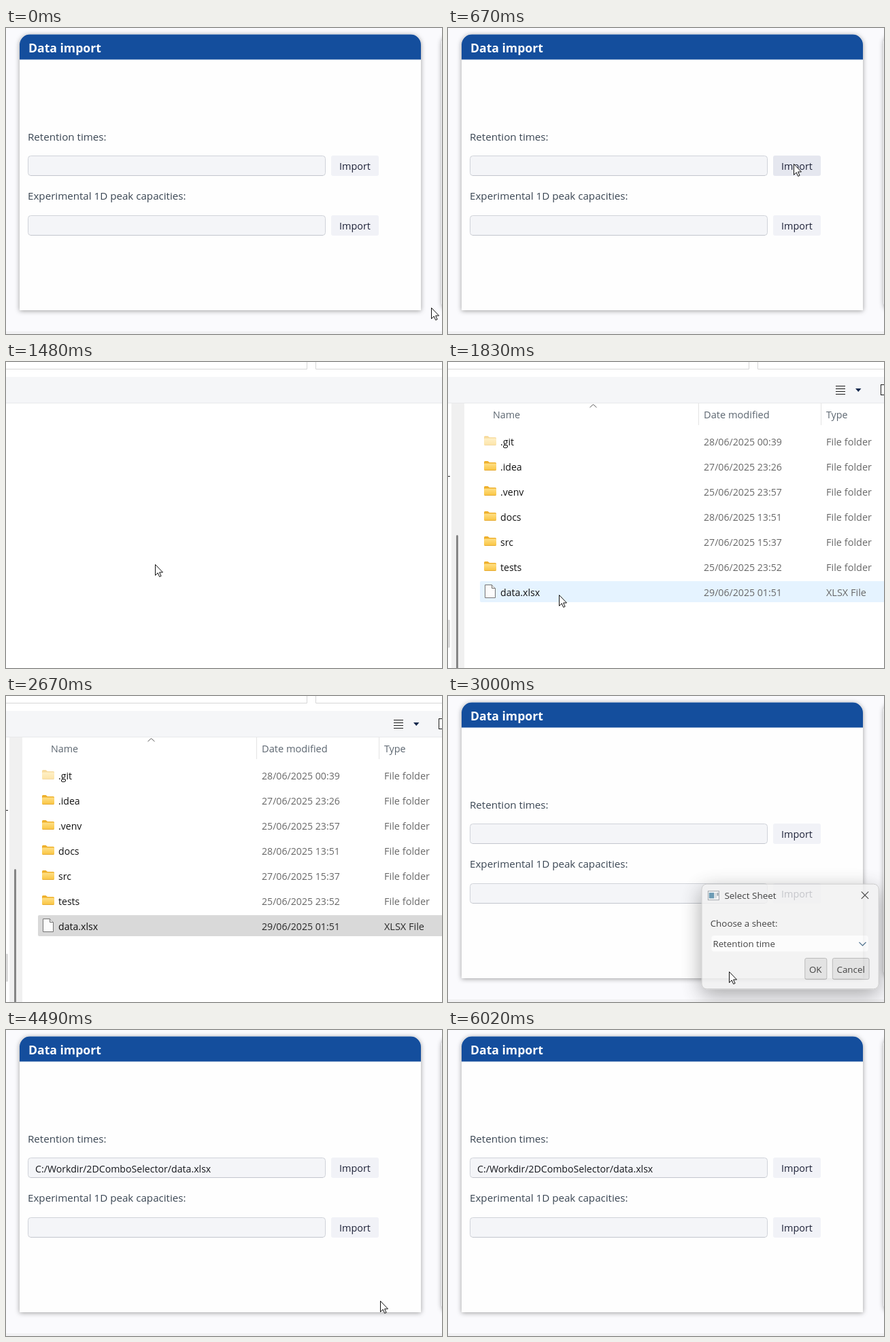
Animation of 641 by 451 pixels, one loop 6630 ms. Source, as an HTML page:

```html
<!DOCTYPE html>
<html lang="en">
<head>
<meta charset="utf-8">
<title>Data import</title>
<style>
  html, body { margin: 0; width: 100%; height: 100%; overflow: hidden; background: #fafafd; }
  svg { display: block; width: 641px; height: 451px; }
  text { font-family: "Open Sans", "Noto Sans", sans-serif; white-space: pre; }
</style>
</head>
<body>
<svg id="stage" viewBox="0 0 641 451" xmlns="http://www.w3.org/2000/svg"></svg>
<script>
const LOOP = 6630, STEP = 66;
const stage = document.getElementById('stage');

const txt = (x, y, s, size, fill, extra = '') =>
  `<text x="${x}" y="${y}" font-size="${size}" fill="${fill}" ${extra}>${s}</text>`;
const box = (x, y, w, h, fill, extra = '') =>
  `<rect x="${x}" y="${y}" width="${w}" height="${h}" fill="${fill}" ${extra}/>`;
const line = (d, stroke, width = 1, extra = '') =>
  `<path d="${d}" fill="none" stroke="${stroke}" stroke-width="${width}" ${extra}/>`;

// Import card
const field = y =>
  box(32.5, y + .5, 437, 29, '#f4f5f8', 'rx="4" stroke="#d0d3d9"') +
  line(`M36 ${y + 29.5}H466`, '#c3c6cd');
const button = (y, id) =>
  box(478, y, 70, 30, '#f1f2f7', `rx="3" id="${id}"`) +
  txt(490, y + 21, 'Import', 14.4, '#1e2238');
const panel = (bottom, fill) =>
  `<path d="M20 ${bottom}V24.500a15 15 0 0 1 15-15H595a15 15 0 0 1 15 15V${bottom}Z" fill="${fill}"/>`;

const card =
  box(0, 0, 641, 451, '#fafafd') +
  box(0, 447, 641, 4, '#f2f2f4') +
  `<g filter="url(#soft)">${panel(416, '#fefefe')}${box(640.5, 10, 60, 406, '#fefefe', 'rx="12"')}</g>` +
  panel(46.5, '#144e9d') +
  txt(33, 36, 'Data import', 17.6, '#fff', 'font-weight="700"') +
  txt(32, 166, 'Retention times:', 15.15, '#3a4653') +
  field(188) + button(188, 'importBtn') +
  txt(32, 253, 'Experimental 1D peak capacities:', 15.15, '#3a4653') +
  field(276) + button(276, 'importBtn2') +
  txt(43, 210, 'C:/Workdir/2DComboSelector/data.xlsx', 14.15, '#16181d', 'id="path"');

// File browser
const ROWS = [
  ['.git', '28/06/2025 00:39'],
  ['.idea', '27/06/2025 23:26'],
  ['.venv', '25/06/2025 23:57'],
  ['docs', '28/06/2025 13:51'],
  ['src', '27/06/2025 15:37'],
  ['tests', '25/06/2025 23:52'],
  ['data.xlsx', '29/06/2025 01:51']
];
const ROW_TOP = 101, ROW_GAP = 37, ROW_H = 31, LAST = ROWS.length - 1;

const folder = (y, faded) =>
  `<g transform="translate(53 ${y})" opacity="${faded ? .45 : 1}">
    <path d="M0 1.500Q0 0 1.500 0H5.500L8 2H16.500Q18 2 18 3.500V7H0Z" fill="#eeb02c"/>
    <rect y="3.500" width="18" height="10.500" rx="1.300" fill="url(#gold)"/>
    <path d="M1 13.500H17" stroke="#e5ab38"/>
  </g>`;
const sheetIcon = y =>
  `<g transform="translate(54.500 ${y})" fill="#fcfcfc" stroke="#747474">
    <path d="M0 0H10L15 5V19H0Z"/><path d="M10 0V5H15" fill="#e8e8e8"/>
  </g>`;

const row = ([name, date], i) => {
  const y = ROW_TOP + ROW_GAP * i, base = y + 22, isFile = i === LAST;
  const meta = isFile ? 'class="meta"' : '';
  return (isFile ? sheetIcon(y + 5.5) : folder(y + 8, i === 0)) +
    txt(77, base, name, 14.1, '#111') +
    txt(376, base, date, 14.15, '#686868', meta) +
    txt(556, base, isFile ? 'XLSX File' : 'File folder', 14.5, '#686868', meta);
};

const browser =
  box(0, 0, 641, 451, '#fff') +
  line('M0 10.500H442.500V0M455.500 0V10.500H641', '#d6d6d6') +
  box(0, 22, 641, 39, '#f5f6f8') +
  line('M0 60.500H641', '#e8e9eb') +
  `<g id="list">` +
    line('M570 35.500H584M570 39.500H584M570 43.500H584M570 47.500H584', '#1c1c1c') +
    `<path d="M599 39H607.500L603.250 44Z" fill="#15294d"/>` +
    box(636.5, 33.5, 14, 15, '#fff', 'stroke="#1c1c1c"') +
    box(5, 61, 19, 390, '#f0f0f0') +
    box(12, 255, 3, 210, '#858585', 'rx="1.5"') +
    box(-4, 380, 7, 41, '#dadada', 'rx="1"') +
    line('M0 168.500H3', '#222') +
    line('M208.500 67L213.500 62.500L218.500 67', '#5c5c5c') +
    line('M368.500 61V93M548.500 61V93', '#e3e3e3') +
    txt(66, 83, 'Name', 14.3, '#5c6670') +
    txt(376, 83, 'Date modified', 14.6, '#5c6670') +
    txt(556, 83, 'Type', 14.3, '#5c6670') +
    box(47, 0, 600, ROW_H, '#e5f3ff', 'rx="2" id="mark"') +
    ROWS.map(row).join('') +
  `</g>`;

// Sheet chooser
const push = (x, w, label, tx, id) =>
  box(x + .5, 390.5, w - 1, 33, '#dddddd', `rx="2.5" stroke="#a6a6a6" id="${id}"`) +
  txt(tx, 413, label, 14.2, '#151515');

const chooser =
  `<g filter="url(#deep)">${box(369.5, 274.5, 276, 164, '#f1f1f1', 'rx="8" stroke="#b9b9b9"')}</g>` +
  box(379.5, 285.5, 17, 14, '#f7f7f7', 'stroke="#8b9298"') +
  box(381, 288, 8, 9, '#4b86a5') +
  box(390.5, 288, 2, 9, '#c3cbd1') + box(393.5, 288, 2, 5, '#7d8b95') +
  txt(405, 298, 'Select Sheet', 14.3, '#151515') +
  line('M618.500 286.500L629.500 297.500M629.500 286.500L618.500 297.500', '#1c1c1c', 1.2) +
  txt(383, 341, 'Choose a sheet:', 14.2, '#151515') +
  box(385, 355, 244, 25, '#fcfcfc', 'rx="4"') +
  txt(387, 373, 'Retention time', 14.1, '#151515') +
  line('M615 365.500L620.300 370.700L625.600 365.500', '#1d4a70', 1.3) +
  push(530, 35, 'OK', 537, 'ok') +
  push(573, 58, 'Cancel', 580, 'cancel');

stage.innerHTML =
  `<defs>
    <filter id="soft" x="-5%" y="-5%" width="110%" height="110%">
      <feDropShadow dx="0" dy="1" stdDeviation="3.500" flood-color="#000" flood-opacity=".38"/>
    </filter>
    <filter id="deep" x="-30%" y="-40%" width="160%" height="190%">
      <feDropShadow dx="0" dy="9" stdDeviation="16" flood-color="#000" flood-opacity=".42"/>
    </filter>
    <linearGradient id="gold" x2="0" y2="1">
      <stop stop-color="#ffdf85"/><stop offset="1" stop-color="#f9c440"/>
    </linearGradient>
  </defs>
  <g>${card}</g>
  <g id="browser">${browser}</g>
  <g id="chooser">${chooser}</g>
  <path id="cursor" d="M.5 .5V16.500L4.200 12.900L6.700 18.500L9.100 17.400L6.600 12H11.500Z"
    fill="#fff" stroke="#111" stroke-linejoin="round"/>`;

const el = id => document.getElementById(id);
const ui = Object.fromEntries(
  ['path', 'importBtn', 'browser', 'list', 'mark', 'chooser', 'ok', 'cursor'].map(id => [id, el(id)]));
const meta = document.querySelectorAll('.meta');

// Pointer route: time, x, y
const ROUTE = [
  [0, 625, 412], [250, 592, 330], [400, 548, 232], [530, 520, 172], [664, 508, 200],
  [800, 508, 200], [960, 440, 222], [1130, 328, 252], [1270, 259, 274],
  [1550, 202, 308], [1830, 163, 343], [2670, 163, 343],
  [2800, 270, 372], [3000, 413, 406], [3200, 392, 402], [3300, 392, 402],
  [3480, 472, 364], [3650, 560, 357], [3820, 558, 385], [3950, 550, 399],
  [4880, 550, 399], [4890, 550, 398], [LOOP, 550, 398]
];
const BEATS = [0, 70, 830, 1270, 1550, 1830, 2670, 3000, 3350, 3820, 4090, 4890, 6020];

const ramp = (t, a, b) => Math.min(1, Math.max(0, (t - a) / (b - a)));
const easeOut = p => 1 - (1 - p) ** 3;
const show = (node, on) => node.setAttribute('visibility', on ? 'inherit' : 'hidden');
const inside = ([x, y], l, t, r, b) => x >= l && x < r && y >= t && y < b;

// The screen refreshes in short steps counted from each burst of activity
function snap(t) {
  const start = BEATS.filter(b => b <= t).pop();
  return start + Math.floor((t - start) / STEP) * STEP;
}

function pointer(t) {
  const i = Math.max(1, ROUTE.findIndex(k => k[0] >= t));
  const [t0, x0, y0] = ROUTE[i - 1], [t1, x1, y1] = ROUTE[i];
  const p = ramp(t, t0, t1);
  return [Math.round(x0 + (x1 - x0) * p), Math.round(y0 + (y1 - y0) * p)];
}

function render(time) {
  const t = snap(time), pos = pointer(t);

  ui.cursor.setAttribute('transform', `translate(${pos})`);
  show(ui.cursor, t < 6020 && !(t >= 2670 && t < 2730));

  ui.importBtn.setAttribute('fill', t < 1200 && inside(pos, 478, 188, 548, 218) ? '#e5e7ef' : '#f1f2f7');
  show(ui.path, t >= 4400);

  const fade = ramp(t, 1340, 1460) - ramp(t, 2740, 2870);
  ui.browser.setAttribute('opacity', fade);
  show(ui.browser, fade > 0);
  show(ui.list, t >= 1550 && fade > 0);

  const picked = t >= 2670;
  const over = Math.floor((pos[1] - ROW_TOP) / ROW_GAP);
  const index = picked ? LAST : Math.min(LAST, Math.max(0, over));
  ui.mark.setAttribute('y', ROW_TOP + ROW_GAP * index);
  ui.mark.setAttribute('fill', picked ? '#d9d9d9' : '#e5f3ff');
  meta.forEach(m => m.setAttribute('fill', picked ? '#2a2a2a' : '#686868'));

  const open = easeOut(ramp(t, 2930, 3230)), shut = ramp(t, 4090, 4350);
  const scale = 1 - .126 * (1 - open) - .1 * shut;
  const alpha = Math.min(1, open * 1.45) * (1 - shut);
  ui.chooser.setAttribute('opacity', alpha);
  ui.chooser.setAttribute('transform', `translate(430 320) scale(${scale}) translate(-430 -320)`);
  show(ui.chooser, alpha > 0);
  ui.ok.setAttribute('fill', t > 3300 && inside(pos, 530, 390, 565, 424) ? '#e6e6e6' : '#dddddd');
}

const begin = performance.now();
function tick() {
  render((performance.now() - begin) % LOOP);
  requestAnimationFrame(tick);
}
tick();
</script>
</body>
</html>
```
